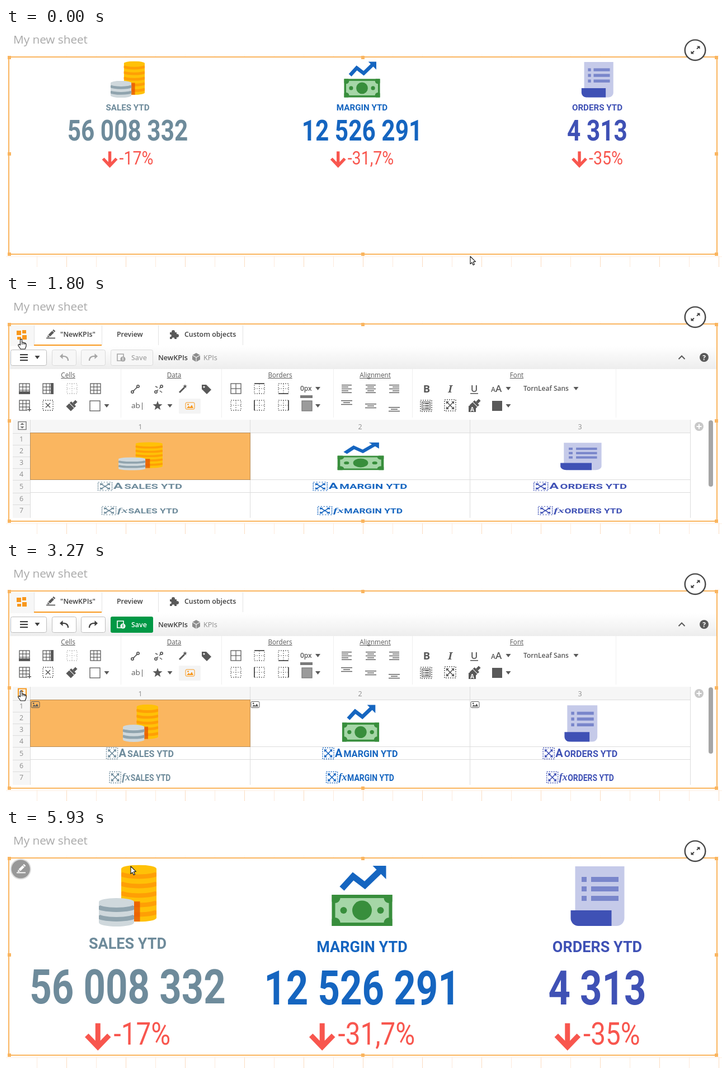
These frames come from a looping animation (1280 px wide and 429 px high, 6.34 s). An HTML page with a canvas:

```html
<!DOCTYPE html>
<html lang="en">
<head>
<meta charset="utf-8">
<title>KPI sheet</title>
<style>
html, body { margin: 0; width: 100%; height: 100%; overflow: hidden; background: #fff; }
canvas { display: block; }
</style>
</head>
<body>
<canvas id="stage" width="1280" height="429"></canvas>
<script>
const c = document.getElementById('stage').getContext('2d');
const LOOP = 6340, STEP = 1000 / 15, CONDENSED = 0.865, CONDENSED_BOLD = 0.815;
const UI = '"Open Sans", sans-serif', KPI = 'Roboto, sans-serif';
const ORANGE = '#fab55f', ACCENT = '#f8981d', INK = '#595959', RED = '#f8564e';

const COLS = [
  { x: 217.5, cell: 239.5, name: 'SALES YTD', num: '56 008 332', pct: '-17%', color: '#6e8b9b', icon: coins, lift: 6 },
  { x: 636.5, cell: 633, name: 'MARGIN YTD', num: '12 526 291', pct: '-31,7%', color: '#1565c0', icon: money, lift: 0 },
  { x: 1057, cell: 1026.5, name: 'ORDERS YTD', num: '4 313', pct: '-35%', color: '#3f51b5', icon: invoice, lift: 0 }
];
const SMALL = { icon: 0.593, iconY: 92.5, label: 15.2, labelY: 148, num: 52, numY: 202, pct: 33, pctY: 244.5, lift: 0 };
const BIG = { icon: 1, iconY: 120, label: 27, labelY: 221, num: 84.5, numY: 314.5, pct: 55, pctY: 387, lift: 1 };

// ---------- helpers ----------
function rect(x, y, w, h, fill) { c.fillStyle = fill; c.fillRect(x, y, w, h); }
function disc(x, y, r, fill) { c.fillStyle = fill; c.beginPath(); c.arc(x, y, r, 0, 7); c.fill(); }
function round(x, y, w, h, r, fill, stroke) {
  c.beginPath(); c.roundRect(x, y, w, h, r);
  if (fill) { c.fillStyle = fill; c.fill(); }
  if (stroke) { c.strokeStyle = stroke; c.lineWidth = 1; c.stroke(); }
}
function trace(pts, close) {
  c.beginPath();
  for (let i = 0; i < pts.length; i += 2) c.lineTo(pts[i], pts[i + 1]);
  if (close) c.closePath();
}
function poly(fill, ...pts) { trace(pts, true); c.fillStyle = fill; c.fill(); }
function line(color, w, ...pts) { trace(pts); c.strokeStyle = color; c.lineWidth = w; c.stroke(); }
function text(s, x, y, font, color, align = 'left') {
  c.font = font; c.fillStyle = color; c.textAlign = align; c.fillText(s, x, y);
}
function at(x, y, sx, sy, draw) {
  c.save(); c.translate(x, y); c.scale(sx, sy); draw(); c.restore();
}
function dotted(draw) { c.setLineDash([2, 2]); draw(); c.setLineDash([]); }
function box(x, y, s, color, w = 1.3) {
  c.strokeStyle = color; c.lineWidth = w; c.strokeRect(x - s / 2, y - s / 2, s, s);
}
function caret(x, y, color = INK) { poly(color, x - 4.5, y - 3, x + 4.5, y - 3, x, y + 3); }

// ---------- KPI icons, centred on the origin ----------
function stack(x, top, w, height, light, dark) {
  const ry = 7, mid = x + w / 2, bottom = top + height;
  c.save();
  c.beginPath();
  c.ellipse(mid, top + ry, w / 2, ry, 0, Math.PI, 0);
  c.ellipse(mid, bottom - ry, w / 2, ry, 0, 0, Math.PI);
  c.closePath(); c.clip();
  rect(x, top, w, height, light);
  c.strokeStyle = dark; c.lineWidth = 8;
  for (let y = top + 21; y < bottom - 8; y += 17) {
    c.beginPath(); c.ellipse(mid, y - ry, w / 2 + 2, ry, 0, 0, Math.PI); c.stroke();
  }
  c.restore();
}
function coins() {
  stack(-11.5, -55.5, 63, 102, '#ffc107', '#ff9f05');
  rect(9, 10, 13, 36, 'rgba(230,81,0,.75)');
  stack(-51.5, 4, 63, 51, '#cfd8dc', '#90a4ae');
}
function money() {
  const green = '#388e3c';
  rect(-54, -2, 108, 56, green);
  rect(-48, 4, 96, 44, '#a5d6a7');
  c.save();
  c.beginPath(); c.rect(-54, -2, 108, 56); c.clip();
  for (const x of [-48, 48]) for (const y of [4, 48]) disc(x, y, 9, green);
  c.restore();
  disc(0, 26, 17.5, green); disc(-33, 26, 6, green); disc(33, 26, 6, green);
  line('#1565c0', 11, -36, -13, -16, -35, 5, -19, 34, -47);
  poly('#1565c0', 43, -54, 19, -54, 43, -30);
}
function invoice() {
  round(-39.5, -53, 88, 107, [0, 0, 14, 14], '#c5cae9');
  round(-47.5, 26, 73, 28, [0, 0, 0, 14], '#3f51b5');
  for (const y of [-34, -17, 0]) { rect(-28, y, 9, 9, '#7986cb'); rect(-11, y, 49, 9, '#7986cb'); }
}

// ---------- sheet ----------
function sheet() {
  rect(0, 0, 1280, 429, '#fff');
  text('My new sheet', 13, 28, '20.7px ' + UI, '#a9a9a9');
  for (let i = 0; i < 24; i++) {
    const x = Math.round(55 + i * 53);
    rect(x, 409, 1, 20, i % 2 ? '#fbdcc0' : '#fdeadb');
    rect(x, 48, 1, 4, '#fef3ea');
  }
  rect(0, 410, 1280, 1, '#fdf0e4');
}
function selection() {
  c.strokeStyle = ORANGE; c.lineWidth = 2; c.strokeRect(5, 52, 1266, 354);
  for (const x of [6, 638, 1270]) for (const y of [53, 226, 406])
    if (x !== 638 || y !== 226) rect(x - 3, y - 3, 6, 6, ORANGE);
}
function expandButton() {
  disc(1232, 40, 18.5, '#fff');
  c.strokeStyle = '#484848'; c.lineWidth = 2.4;
  c.beginPath(); c.arc(1232, 39.7, 18.3, 0, 7); c.stroke();
  for (const s of [1, -1]) at(1232.5, 39.5, s, s, () => {
    line('#404040', 1.8, 2.5, -2, 6, -5.5);
    poly('#404040', 8, -7, 2.5, -7, 8, -1.5);
  });
}
function pencil(x, y, color) {
  at(x, y, 1, 1, () => {
    c.save(); c.rotate(-Math.PI / 4);
    rect(-4, -2.3, 10, 4.6, color); rect(7, -2.3, 2.5, 4.6, color);
    poly(color, -5, -2.3, -5, 2.3, -8.5, 0);
    c.restore();
    rect(-8, 6.5, 16, 1.8, color);
  });
}
function editButton(hover) {
  disc(26.3, 72, 18.6, '#dcdcdc');
  disc(26.3, 72, 16.6, hover ? '#808080' : '#989898');
  pencil(27, 71, '#fff');
}
function downArrow() {
  line(RED, 5.4, 14, 0, 14, 25);
  line(RED, 5.4, 2, 13, 14, 25.5, 26, 13);
}
function condensed(s, x, y, squeeze, font, color, align) {
  at(x, y, squeeze, 1, () => text(s, 0, 0, font, color, align));
}
function dashboard(v) {
  for (const k of COLS) {
    const lift = k.lift * v.lift;
    at(k.x, v.iconY, v.icon, v.icon, k.icon);
    text(k.name, k.x, v.labelY - lift, `600 ${v.label}px ${KPI}`, k.color, 'center');
    condensed(k.num, k.x, v.numY - lift / 4, CONDENSED_BOLD, `600 ${v.num}px ${KPI}`, k.color, 'center');
    const z = v.pct / 33, font = `${v.pct}px ${KPI}`;
    c.font = font;
    const x = k.x - (31 * z + c.measureText(k.pct).width * CONDENSED) / 2;
    at(x, v.pctY - 23 * z, z, z, downArrow);
    condensed(k.pct, x + 31 * z, v.pctY, CONDENSED, font, RED, 'left');
  }
}

// ---------- editor ----------
function fitIcon(x, y, s, color) {
  dotted(() => box(x, y, s, color, 1.5));
  const r = s / 2 - 3;
  for (const a of [1, -1]) {
    line(color, 1.6, x - r, y - a * r, x + r, y + a * r);
    for (const b of [1, -1])
      poly(color, x + a * r, y + b * r, x + a * (r - 5), y + b * r, x + a * r, y + b * (r - 5));
  }
}
function photo(x, y, w, h, color) {
  round(x, y, w, h, 2, null, color);
  poly(color, x + 2, y + h - 2, x + w * .35, y + h * .5, x + w * .5, y + h * .7, x + w * .7, y + h * .35, x + w - 2, y + h - 2);
  disc(x + w * .28, y + h * .3, 1.4, color);
}
function grid(x, y, n, color, s = 18) {
  box(x, y, s, color);
  for (let i = 1; i < n; i++) {
    const d = i * s / n - s / 2;
    line(color, 1.2, x - s / 2, y + d, x + s / 2, y + d);
    line(color, 1.2, x + d, y - s / 2, x + d, y + s / 2);
  }
}
function bars(x, y, align, widths) {
  widths.forEach((w, i) => rect(x - 9 + (18 - w) * align, y + i * 3.4, w, 1.4, INK));
}
function button(x, w, on) { round(x + .5, 98.5, w, 28, 3, on ? '#fff' : '#f7f7f7', on ? '#bdbdbd' : '#dadada'); }
function turn(x, dir, color) {
  at(x, 112, dir, 1, () => {
    c.strokeStyle = color; c.lineWidth = 2.2;
    c.beginPath(); c.moveTo(-4, -2); c.quadraticCurveTo(7, -3, 7, 6); c.stroke();
    poly(color, -8, -2, -2.5, -7, -2.5, 3);
  });
}
function tabs() {
  const font = '600 12.4px ' + UI;
  rect(7, 54, 43, 44, '#f7f7f7');
  rect(19, 64, 8, 8, ACCENT); rect(29, 63, 7, 6, ACCENT);
  rect(20, 75, 7, 5, ACCENT); rect(29, 72, 8, 8, ACCENT);
  for (const x of [50, 171, 272, 423]) rect(x, 54, 1, 36, '#e3e3e3');
  rect(50, 89, 121, 2, ACCENT);
  pencil(80, 70, INK);
  text('"NewKPIs"', 97, 75, font, '#404040');
  text('Preview', 198, 75, font, '#404040');
  rect(293, 67, 12, 12, INK); disc(299, 66, 3, INK); disc(306, 73, 3, INK);
  disc(299, 78.5, 2.3, '#fff'); disc(293.5, 73, 2.3, '#fff');
  text('Custom objects', 319, 75, font, '#404040');
}
function toolbar(dirty, saveHover) {
  const shade = c.createLinearGradient(0, 92, 0, 133);
  shade.addColorStop(0, '#ffffff'); shade.addColorStop(1, '#ededed');
  rect(7, 92, 1263, 41, shade);
  button(8, 64, true);
  for (const y of [106, 111, 116]) rect(25, y, 14, 2.2, '#404040');
  caret(56, 112, '#404040');
  button(82, 43, dirty); turn(104, 1, dirty ? '#404040' : '#a6a6a6');
  button(134, 43, dirty); turn(156, -1, dirty ? '#404040' : '#a6a6a6');
  const ink = dirty ? '#fff' : '#a6a6a6';
  if (dirty) round(187, 98, 76, 29, 3, saveHover ? '#2fab69' : '#009845');
  else button(187, 75, false);
  line(ink, 1.6, 206, 118, 199, 118, 199, 106, 210, 106, 210, 111);
  disc(209, 115, 4.6, ink);
  line(dirty ? '#009845' : '#f7f7f7', 1.3, 209, 112, 209, 117.5);
  text('Save', 224, 116.5, '600 12.4px ' + UI, ink);
  text('NewKPIs', 272, 117, '600 12.6px ' + UI, '#404040');
  poly('#8c8c8c', 340, 104, 347, 108, 347, 116, 340, 120, 333, 116, 333, 108);
  line('#f2f2f2', 1.2, 333, 108, 340, 112, 347, 108); line('#f2f2f2', 1.2, 340, 112, 340, 120);
  text('KPIs', 353, 117, '12.6px ' + UI, '#8c8c8c');
  line(INK, 2, 1202.5, 115, 1208, 109.5, 1213.5, 115);
  disc(1248, 112, 8, INK);
  text('?', 1248, 116.5, 'bold 12px ' + UI, '#fff', 'center');
}
function brush(x, y) {
  at(x, y, 1, 1, () => {
    c.rotate(Math.PI / 4);
    rect(-2.5, -11, 5, 7, INK); rect(-6, -4, 12, 4, INK); rect(-6, 1, 12, 8, INK);
  });
}
function links(x, y, broken) {
  line(INK, 1.6, x - 5, y + 5, x - 1, y + 1);
  line(INK, 1.6, x + 1, y - 1, x + 5, y - 5);
  if (broken) { line(INK, 1.4, x - 6, y - 5, x - 2, y - 3); line(INK, 1.4, x + 2, y + 3, x + 6, y + 6); }
  else line(INK, 1.6, x - 4, y + 4, x + 4, y - 4);
  disc(x - 5, y + 5, 3, INK); disc(x + 5, y - 5, 3, INK);
  disc(x - 5, y + 5, 1.2, '#fff'); disc(x + 5, y - 5, 1.2, '#fff');
}
function star(x, y, r) {
  const pts = [];
  for (let i = 0; i < 10; i++) {
    const a = i * Math.PI / 5 - Math.PI / 2, q = i % 2 ? r * .42 : r;
    pts.push(x + q * Math.cos(a), y + q * Math.sin(a));
  }
  poly(INK, ...pts);
}
function ribbon() {
  rect(7, 133, 1263, 87, '#fff');
  for (const x of [205, 385, 585, 726, 1090]) rect(x, 133, 1, 87, '#efefef');
  for (const [s, x] of [['Cells', 111], ['Data', 300.5], ['Borders', 490], ['Alignment', 660], ['Font', 913]]) {
    text(s, x, 148, '11.7px ' + UI, INK, 'center');
    const w = c.measureText(s).width;
    rect(x - w / 2, 149, w, 1, INK);
  }
  grid(33, 168, 3, INK); rect(23, 173, 20, 5, INK);
  grid(75, 168, 3, INK); rect(80, 158, 5, 20, INK);
  dotted(() => grid(118, 168, 2, '#c4c4c4'));
  grid(160, 168, 3, INK);
  grid(33, 198, 3, INK); rect(38, 204, 8, 6, '#fff'); rect(38, 205, 7, 1.5, INK); rect(41, 202, 1.5, 7, INK);
  dotted(() => box(75, 198, 18, INK));
  line(INK, 1.6, 71, 194, 79, 202); line(INK, 1.6, 79, 194, 71, 202);
  brush(118, 198); box(159, 199, 18, INK); caret(180, 199);

  links(231, 169, false); links(273, 169, true);
  line(INK, 3, 310, 175, 319, 166); star(320, 164, 4);
  poly(INK, 350, 161, 358, 161, 367, 170, 359, 178, 350, 169); disc(354, 165, 1.6, '#fff');
  text('ab|', 224, 203, '13.5px ' + UI, INK);
  star(271, 199, 9); caret(293, 199);
  round(309, 186, 39, 27, 2, '#f4f4f4'); photo(321, 193, 16, 12, ACCENT);

  grid(411, 168, 2, INK);
  // the solid edge of each dotted square: top, bottom, none, left, right
  [[453, 168, 0, -1], [496, 168, 0, 1], [411, 198, 0, 0], [453, 198, -1, 0], [496, 198, 1, 0]].forEach(([x, y, dx, dy]) => {
    dotted(() => grid(x, y, 2, '#777'));
    if (dy) rect(x - 9, y + dy * 9 - 1, 18, 2, INK);
    if (dx) rect(x + dx * 9 - 1, y - 9, 2, 18, INK);
  });
  text('0px', 526, 172, '600 12px ' + UI, INK); caret(557.5, 168);
  rect(526, 180, 22, 5, '#7a7a7a');
  rect(529, 190, 18, 18, '#9b9b9b'); box(538, 199, 18, '#7a7a7a'); caret(557.5, 199);

  [609, 652, 694].forEach((x, i) => {
    bars(x, 161, i / 2, [18, 12, 18, 12, 18]);
    bars(x, 189 + i * 6, .5, [20, 12, 20]);
  });

  text('B', 752, 175, 'bold 18.5px ' + UI, INK, 'center');
  text('I', 794, 175, 'italic bold 18.5px "Noto Serif", serif', INK, 'center');
  text('U', 837, 174, '600 17px ' + UI, INK, 'center'); rect(830, 176, 14, 1.6, INK);
  text('A', 867, 174, '600 12px ' + UI, INK); text('A', 875, 174, '600 17px ' + UI, INK); caret(898, 168);
  text('TornLeaf Sans', 925, 172, '600 12px ' + UI, INK); caret(1019, 168);
  dotted(() => box(751, 199, 20, INK, 1.5)); box(751, 199, 14, INK);
  for (const y of [195, 199, 203]) { rect(746, y - 1, 2, 2, INK); rect(749, y - 1, 7, 2, INK); }
  fitIcon(794, 198, 20, INK);
  brush(839, 196); rect(827, 199, 13, 11, INK); text('A', 833.5, 208.5, 'bold 10px ' + UI, '#fff', 'center');
  rect(869, 190, 18, 18, INK); caret(898, 199);
}
function tableCell(k, y, row, sx, sy) {
  const plain = row === 5, font = `600 16.1px ${KPI}`, squeeze = plain ? 1 : CONDENSED;
  c.font = font;
  const w = 38 + c.measureText(k.name).width * squeeze;
  at(k.cell, y, sx, sy, () => {
    const x = -w / 2;
    fitIcon(x + 10.5, 0, 20, k.color);
    if (plain) text('A', x + 22.5, 6.5, 'bold 20px ' + KPI, k.color);
    else text('fx', x + 22.5, 5, 'italic bold 18px "Liberation Serif", serif', k.color);
    condensed(k.name, x + 38, 6, squeeze, font, k.color, 'left');
  });
}
function table(t) {
  const edges = [43, 436, 829, 1223], rows = [248, 269, 290, 311, 332, 355, 376, 400], rule = '#dcdcdc';
  rect(12, 224, 1212, 24, '#f6f6f6'); rect(12, 248, 31, 152, '#f6f6f6');
  edges.forEach((x, i) => {
    rect(x, 224, 1, 176, rule);
    if (i < 3) text(i + 1, x + 197, 241, '12.5px ' + UI, '#8c8c8c', 'center');
  });
  rows.slice(0, 7).forEach((y, i) => {
    rect(12, y, 31, 1, rule);
    text(i + 1, 27.5, (y + rows[i + 1]) / 2 + (i === 6 ? 2.5 : 4.5), '12.5px ' + UI, '#8c8c8c', 'center');
  });
  for (const y of [247, 331, 354]) rect(43, y, 1181, 1, rule);
  disc(1239, 236, 8, '#c8c8c8'); rect(1234.5, 235, 9, 2, '#fff'); rect(1238, 231.5, 2, 9, '#fff');
  round(1256, 225, 8, 119, 4, '#a6a6a6');

  const pinned = t >= 3260, hover = t >= 2660 && t < 3860, mark = pinned ? ACCENT : '#737373';
  box(29, 234.5, 14, mark, hover ? 2 : 1.3);
  poly(mark, 25.5, 233, 32.5, 233, 29, 229.5); poly(mark, 25.5, 236, 32.5, 236, 29, 239.5);

  rect(43, 247, 394, 85, '#b98d58'); rect(44, 248, 392, 83, '#fab660');
  if (t < 1390) return;
  const wide = t < 1990, loose = t < 2190;
  const fit = wide ? [.765, .457, 1.25, .75] : loose ? [.59, .615, .965, 1] : [.612, .61, 1, 1];
  COLS.forEach((k, i) => {
    at(k.cell + 1, 289.5, fit[0], fit[1], k.icon);
    if (!wide) photo(edges[i] + (loose ? 8 : 2), 250.5, 15, 11, INK);
    tableCell(k, 343.5, 5, fit[2], fit[3]);
    tableCell(k, loose ? 387 : 386.5, 7, fit[2], fit[3]);
  });
}
function editor(t) {
  rect(6, 53, 1264, 353, '#fff');
  tabs();
  toolbar(t >= 3260 && t < 4460, t >= 4130);
  ribbon();
  table(t);
}

// ---------- cursor ----------
const PATH = [[0, 830, 410], [66, 830, 410], [667, 66, 121], [800, 30, 95], [1067, 27, 79], [1867, 27, 79],
  [2133, 40, 156], [2600, 28, 229], [2867, 27, 231], [3700, 27, 231], [4267, 218, 109], [4450, 218, 109],
  [4733, 223, 67], [LOOP, 223, 67]];
const HAND = [[900, 2230], [2500, 3860], [4130, 4460], [4600, 4925]];

function cursor(t) {
  const i = PATH.findIndex(p => p[0] > t), [t0, x0, y0] = PATH[i - 1], [t1, x1, y1] = PATH[i];
  const u = (t - t0) / (t1 - t0), e = u * u * (3 - 2 * u);
  const hand = HAND.some(([a, b]) => t >= a && t < b);
  at(x0 + (x1 - x0) * e, y0 + (y1 - y0) * e, 1, 1, () => {
    if (hand) trace([-1.5, 1, 0, 0, 1.5, 1, 1.5, 6, 4, 6, 5, 7, 7, 7, 8, 8, 9, 9, 9, 13, 7, 18, -1, 18, -5, 12, -5, 10, -3, 9.5, -1.5, 11], true);
    else trace([0, 0, 0, 13.5, 3, 10.8, 5.2, 15.5, 7.4, 14.5, 5.3, 9.8, 9.4, 9.4], true);
    c.fillStyle = '#fff'; c.fill();
    c.strokeStyle = '#111'; c.lineWidth = 1.1; c.lineJoin = 'round'; c.stroke(); c.lineJoin = 'miter';
    if (hand) for (const x of [1.5, 4, 6.5]) line('#111', .9, x, 6.5, x, 10);
  });
}

function draw(now) {
  const t = Math.floor((now % LOOP + 4) / STEP) * STEP;
  const editing = t >= 1325 && t < 4925;
  sheet();
  if (editing) editor(t);
  else {
    rect(6, 53, 1264, 353, '#fff');
    if (t < 1325) dashboard(SMALL);
    else if (t >= 5060) dashboard(BIG);
    if (t >= 190) editButton(t >= 900 && t < 1325);
  }
  selection();
  expandButton();
  cursor(Math.min(t, LOOP - 1));
}
const start = performance.now();
function tick() { draw(performance.now() - start); requestAnimationFrame(tick); }
tick();
</script>
</body>
</html>
```
